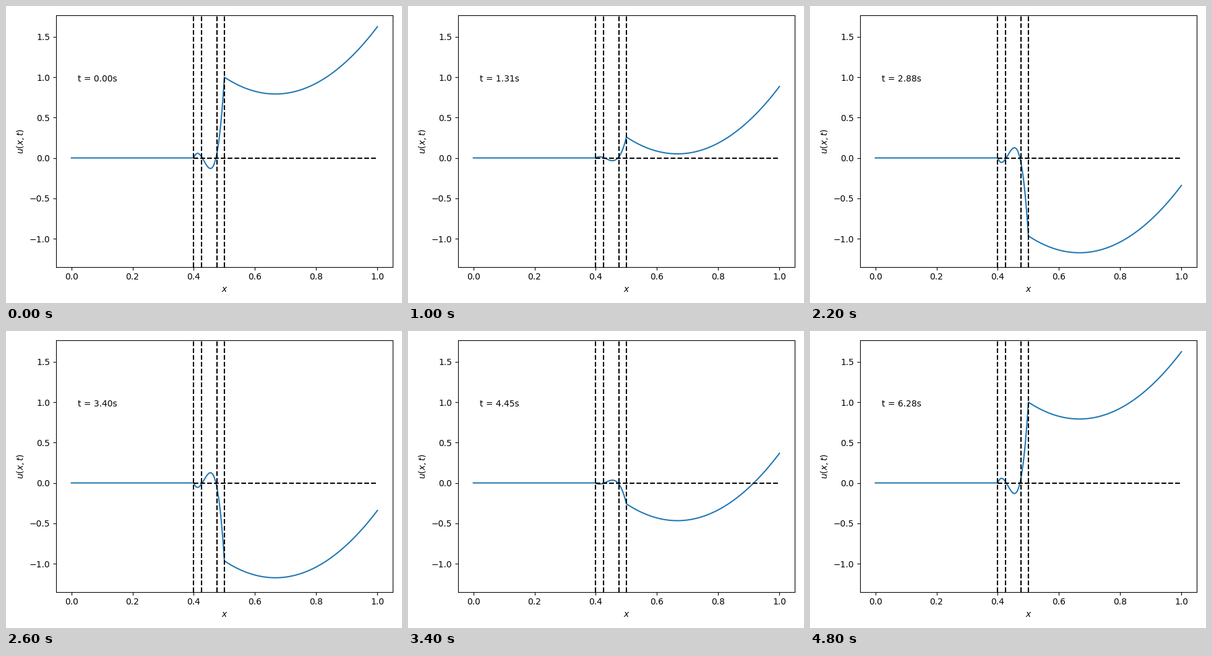
Write a matplotlib script that moves like this. It is 640x480 px and loops after 5000 ms.

```python
import numpy as np
import matplotlib.pyplot as plt
from matplotlib.animation import FuncAnimation

FRAMES = 25
INTERVAL = 200
LEFT, RIGHT = 0.4, 0.5  # transition element
times = np.linspace(0, 2 * np.pi, FRAMES)

x = np.concatenate([[0], np.linspace(LEFT, RIGHT, 60), np.linspace(RIGHT, 1, 60)[1:]])


def solution(t):
    """Cubic nodal basis in the transition element, shifted parabola beyond it."""
    s = (x - LEFT) / (RIGHT - LEFT)
    cubic = 5 * s * (s**2 - s + 0.2) * np.cos(t)
    parabola = np.cos(t) + 7.5 * ((x - 2 / 3) ** 2 - 1 / 36)
    return np.where(x <= LEFT, 0, np.where(x <= RIGHT, cubic, parabola))


fig, ax = plt.subplots(figsize=(6.4, 4.8), dpi=100)
curve, = ax.plot(x, solution(0))
ax.plot([LEFT, 1], [0, 0], "k--")
for edge in (LEFT, 0.425, 0.475, RIGHT):
    ax.axvline(edge, color="k", linestyle="--")
clock = ax.text(0.02, 0.95, "")

low, high = -1 - 7.5 / 36, 1 + 7.5 / 12
pad = 0.05 * (high - low)
ax.set_xlim(-0.05, 1.05)
ax.set_ylim(low - pad, high + pad)
ax.set_xlabel("$x$")
ax.set_ylabel("$u(x,t)$")
fig.tight_layout()


def update(frame):
    t = times[frame]
    curve.set_ydata(solution(t))
    clock.set_text(f"t = {t:.2f}s")
    return curve, clock


anim = FuncAnimation(fig, update, frames=FRAMES, interval=INTERVAL, repeat=True, repeat_delay=0)
plt.show()
```
